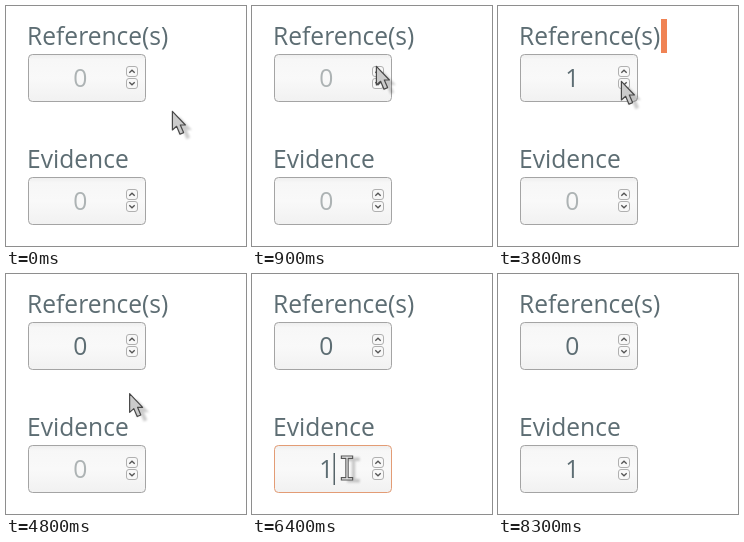
An HTML page with a canvas for the animation above (8400 ms loop, 240x240 px).

```html
<!DOCTYPE html>
<html lang="en">
<head>
<meta charset="utf-8">
<title>Number fields</title>
<style>
  html, body { margin: 0; width: 100%; height: 100%; overflow: hidden; background: #fff; }
  canvas { display: block; width: 240px; height: 240px; }
</style>
</head>
<body>
<canvas id="stage" width="240" height="240"></canvas>
<script>
const ctx = document.getElementById('stage').getContext('2d');
const LOOP = 8400, STEP = 100;
const INK = '#5d6d73', PLACEHOLDER = '#adb3b4';

const upClicks = [1800, 2100, 2700];
const downClicks = [3500, 3800, 4100];

// Each move bends through an optional control point.
const home = { x: 166, y: 105 };
const moves = [
  { start: 0, end: 700, x: 124, y: 60, via: { x: 136, y: 27 } },
  { start: 1000, end: 1200, x: 124, y: 65 },
  { start: 2800, end: 3100, x: 123, y: 75 },
  { start: 4500, end: 5300, x: 95, y: 194, via: { x: 130, y: 150 } },
  { start: 7200, end: 7600, x: 207, y: 168 }
];

const during = (t, from, to) => t >= from && t < to;
const passed = (times, t) => times.filter(time => time <= t).length;
const smooth = p => p * p * (3 - 2 * p);
const bend = (a, b, c, p) => (1 - p) ** 2 * a + 2 * p * (1 - p) * b + p * p * c;

function pointerAt(time) {
  const t = Math.floor(time / STEP) * STEP;
  let from = home;
  for (const to of moves) {
    if (t < to.start) break;
    if (t < to.end) {
      const p = smooth((t - to.start) / (to.end - to.start));
      const via = to.via || { x: (from.x + to.x) / 2, y: (from.y + to.y) / 2 };
      return { x: bend(from.x, via.x, to.x, p), y: bend(from.y, via.y, to.y, p) };
    }
    from = to;
  }
  return from;
}

function text(string, x, baseline, color, align = 'left') {
  ctx.font = '24.6px "Open Sans", sans-serif';
  ctx.textAlign = align;
  ctx.fillStyle = color;
  ctx.fillText(string, x, baseline);
}

function roundBox(x, y, w, h, radius, fill, stroke) {
  ctx.beginPath();
  ctx.roundRect(x + .5, y + .5, w - 1, h - 1, radius);
  ctx.fillStyle = fill;
  ctx.fill();
  ctx.strokeStyle = stroke;
  ctx.lineWidth = 1;
  ctx.stroke();
}

function spinButton(y, direction) {
  roundBox(120, y, 12, 11, 2.5, '#f8f8f8', '#b0b0b0');
  ctx.beginPath();
  ctx.moveTo(123.3, y + 5.5 - direction * 1.3);
  ctx.lineTo(126, y + 5.5 + direction * 1.3);
  ctx.lineTo(128.7, y + 5.5 - direction * 1.3);
  ctx.strokeStyle = '#555';
  ctx.lineWidth = 1.3;
  ctx.stroke();
}

function field(label, top, value, focused) {
  ctx.save();
  ctx.translate(0, top);
  text(label, 21, 39.4, INK);
  const shade = ctx.createLinearGradient(0, 48, 0, 96);
  shade.addColorStop(0, '#ededed');
  shade.addColorStop(.12, '#f7f7f7');
  shade.addColorStop(.5, '#f9f9f9');
  shade.addColorStop(1, '#f1f1f1');
  roundBox(22, 48, 118, 48, 4, shade, focused ? '#e39c75' : '#a4a4a4');
  text(value || '0', 74.3, 81, value ? INK : PLACEHOLDER, 'center');
  spinButton(60, -1);
  spinButton(72, 1);
  ctx.restore();
}

const arrow = new Path2D('M.4 .3V19L4.6 15.3L8 23.2L11.6 21.6L8.3 14H13.4Z');
const beam = new Path2D('M-4.5-10.8H4.5M-4.5 10.8H4.5M0-10.8V10.8');

function strokeShape(shape, color, width) {
  ctx.strokeStyle = color;
  ctx.lineWidth = width;
  ctx.stroke(shape);
}

function drawPointer({ x, y }) {
  const overText = x > 22 && x < 140 && y > 171 && y < 219;
  ctx.save();
  ctx.lineJoin = 'round';
  ctx.lineCap = 'square';
  ctx.translate(x, y);

  ctx.save();
  ctx.translate(6.5, overText ? 2 : 5);
  ctx.filter = 'blur(.8px)';
  ctx.fillStyle = 'rgba(0,0,0,.2)';
  if (overText) strokeShape(beam, 'rgba(0,0,0,.2)', 3.4);
  else ctx.fill(arrow);
  ctx.restore();

  if (overText) {
    strokeShape(beam, '#555', 3.4);
    strokeShape(beam, '#eee', 1.2);
  } else {
    ctx.fillStyle = '#cbcbcb';
    ctx.fill(arrow);
    strokeShape(arrow, '#484848', 1.2);
  }
  ctx.restore();
}

function draw(t) {
  ctx.fillStyle = '#fff';
  ctx.fillRect(0, 0, 240, 240);

  const ups = passed(upClicks, t);
  field('Reference(s)', 0, ups ? String(ups - passed(downClicks, t)) : '', false);
  field('Evidence', 123, t >= 6400 ? '1' : '', during(t, 5500, 7800));

  if (during(t, 3800, 4100)) {
    ctx.fillStyle = '#f08354';
    ctx.fillRect(163, 13, 6, 34);
  }
  if (during(t, 6400, 7100)) {
    ctx.fillStyle = '#566469';
    ctx.fillRect(81.5, 179, 1.5, 32);
  }
  if (t < 8300) drawPointer(pointerAt(t));
}

const start = performance.now();
function tick() {
  draw((performance.now() - start) % LOOP);
  requestAnimationFrame(tick);
}
tick();
</script>
</body>
</html>
```
